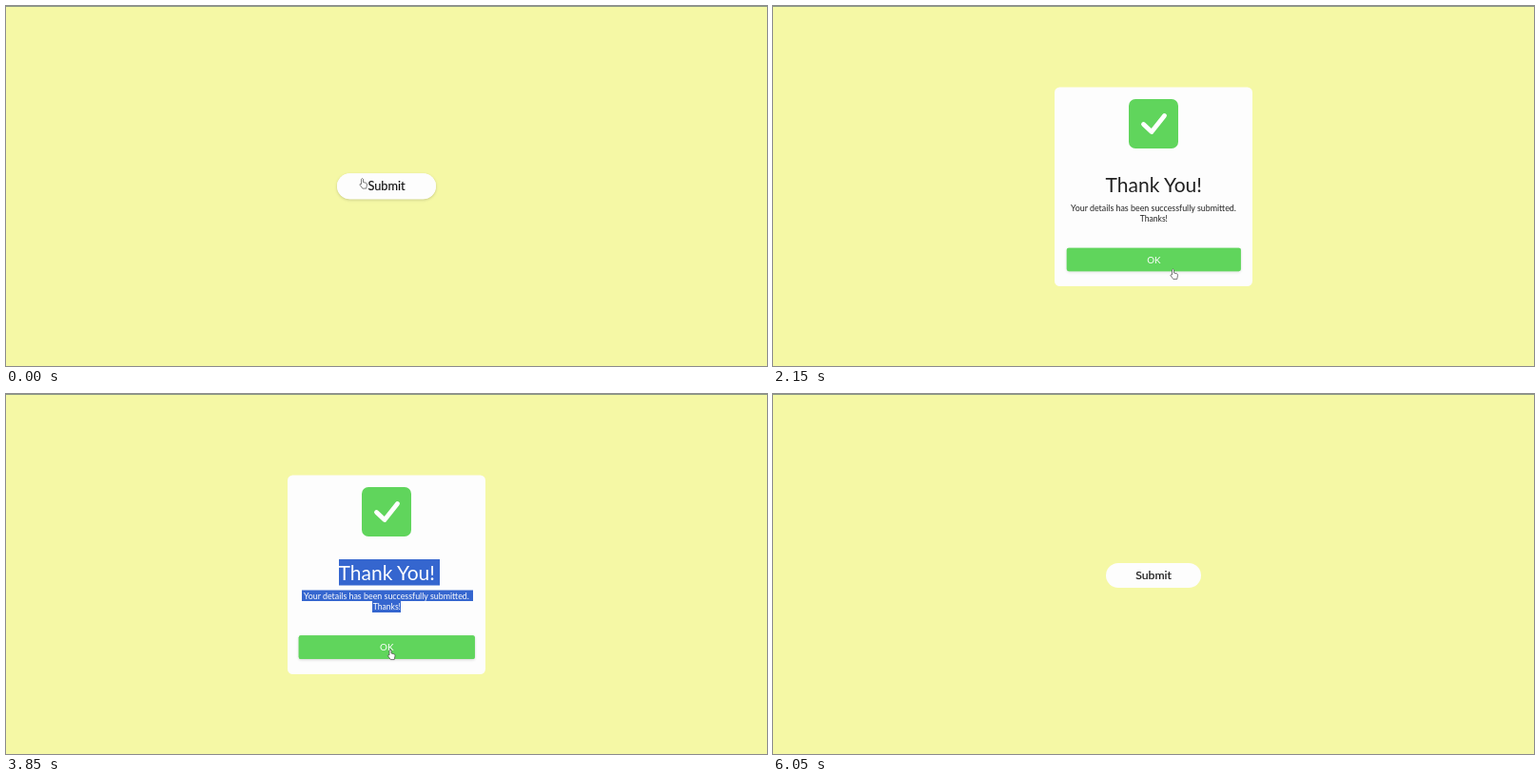
An HTML page for the animation above (6.15 s loop, 800 by 379 pixels).

```html
<!DOCTYPE html>
<html lang="en">
<head>
<meta charset="utf-8">
<title>Submit popup</title>
<style>
  html, body { margin: 0; width: 100%; height: 100%; overflow: hidden; background: #f5f8a5; }
  svg { display: block; width: 100vw; height: 100vh; }
  text { font-family: Lato, sans-serif; text-anchor: middle; }
  .shade { filter: drop-shadow(0 1.5px 1.5px rgba(0, 0, 0, .18)); }
  .ink { fill: #222; }
  .picked .ink { fill: #fff; }
  #marks { fill: #3566cf; visibility: hidden; }
  .picked #marks { visibility: inherit; }
  #cursor path { fill: #fff; stroke: #444; stroke-width: .7; stroke-linejoin: round; }
</style>
</head>
<body>
<svg viewBox="0 0 800 379">
  <rect width="800" height="379" fill="#f5f8a5"/>
  <rect width="800" height="1" fill="#8f9c86"/>

  <g id="submit" fill="#fdfdfd">
    <rect class="shade" x="-50" y="-13" width="100" height="26" rx="13"/>
    <rect x="-50" y="-13" width="100" height="26" rx="13"/>
    <text y="4.2" font-size="12.3" fill="#111" stroke="#111" stroke-width=".15">Submit</text>
  </g>

  <g id="popup">
    <g transform="translate(-400 -190)">
      <g id="panel">
        <rect x="296" y="85.5" width="208" height="209.5" rx="5.5" fill="#fdfdfd"/>
        <rect x="374" y="98" width="52" height="52" rx="7" fill="#60d55c"/>
        <path d="M389.5 124.5L398 132.5L411.5 115.5" fill="none" stroke="#fff" stroke-width="4.8"
              stroke-linecap="round" stroke-linejoin="round"/>
        <g id="marks">
          <rect x="350" y="174" width="106" height="27.5"/>
          <rect x="311" y="206.5" width="180" height="11.5"/>
          <rect x="385" y="218" width="30" height="12"/>
        </g>
        <text class="ink" x="400.3" y="196" font-size="21">Thank You!</text>
        <text class="ink" x="400" y="215.6" font-size="8.9">Your details has been successfully submitted.</text>
        <text class="ink" x="400.3" y="227.4" font-size="8.6">Thanks!</text>
      </g>
      <g id="ok" fill="#60d55c">
        <rect class="shade" x="-88.5" y="-11.8" width="177" height="23.6" rx="2"/>
        <rect x="-88.5" y="-11.8" width="177" height="23.6" rx="2"/>
        <text y="3.6" font-size="9.4" fill="#fff">OK</text>
      </g>
    </g>
  </g>

  <g id="cursor">
    <path id="arrow" d="M0 0V7.4L1.7 5.9L2.8 8.3L3.9 7.8L2.8 5.5H5Z"/>
    <path id="hand" d="M-1 .9Q0 -.8 1 .9V4L4 4.8Q5.2 5.2 5 6.6L4.2 10.6H.3L-2.6 6.6Q-2.6 5.4 -1 6Z"/>
  </g>
</svg>
<script>
  const LOOP = 6150, STEP = 50;
  const MOVE = 400;    // popup travel
  const HOVER = 200;   // button transition
  const LEAVE = 5850;  // pointer gone
  const SELECT = 3000; // text gets selected, until the popup closes

  const rounds = [
    { open: 820, close: 2230 },
    { open: 2580, close: 3890 },
    { open: 4560, close: 5640 }
  ];

  const buttons = {
    submit: { x: 400, y: 191, w: 50, h: 14, grow: .04 },
    ok: { x: 400.3, y: 267.8, w: 88.5, h: 12, grow: .05 }
  };

  // pointer tip: ms, x, y
  const route = [
    [0, 374.5, 181.5], [300, 392, 226], [700, 402, 188],
    [1200, 424, 127], [1500, 405.5, 267], [1680, 412, 317], [2150, 420.5, 277],
    [2550, 404, 188], [3250, 439, 154], [3850, 404, 269],
    [4350, 392.5, 182.5], [4560, 394, 183], [4950, 417.5, 150.5], [5550, 406, 268]
  ];

  const el = id => document.getElementById(id);
  const clamp = v => Math.min(1, Math.max(0, v));
  const show = (id, on) => el(id).setAttribute('visibility', on ? 'inherit' : 'hidden');
  const lastRound = t => rounds.filter(r => r.open <= t).pop();
  const isOpen = t => !!lastRound(t) && t < lastRound(t).close;

  // cubic-bezier(.25, .1, .25, 1)
  function ease(x) {
    if (x <= 0 || x >= 1) return clamp(x);
    const bez = (a, b, u) => 3 * a * u * (1 - u) ** 2 + 3 * b * u * u * (1 - u) + u ** 3;
    let lo = 0, hi = 1;
    for (let i = 0; i < 20; i++) {
      const mid = (lo + hi) / 2;
      if (bez(.25, .25, mid) < x) lo = mid; else hi = mid;
    }
    return bez(.1, 1, lo);
  }

  function pointAt(t) {
    const i = route.findIndex(p => p[0] > t);
    if (i < 0) return route[route.length - 1].slice(1);
    const [t0, x0, y0] = route[i - 1], [t1, x1, y1] = route[i];
    const u = (t - t0) / (t1 - t0), k = u * u * (3 - 2 * u);
    return [x0 + (x1 - x0) * k, y0 + (y1 - y0) * k];
  }

  function isOver(id, t) {
    const b = buttons[id], [x, y] = pointAt(t);
    return isOpen(t) === (id === 'ok') && Math.abs(x - b.x) < b.w && Math.abs(y - b.y) < b.h;
  }

  // share of the last HOVER ms spent over the button
  function hoverAt(id, t) {
    const n = 20;
    let hits = 0;
    for (let i = 0; i < n; i++) hits += isOver(id, Math.max(0, t - i * HOVER / n));
    return ease(hits / n);
  }

  function drawButton(id, t) {
    const { x, y, grow } = buttons[id], h = hoverAt(id, t);
    el(id).setAttribute('transform', `translate(${x} ${y - 1.2 * h}) scale(${1 + grow * h})`);
    el(id).querySelector('.shade').style.opacity = h;
  }

  // on closing the panel hides at once, while its button lingers and flies up
  function drawPopup(t) {
    const round = lastRound(t), open = isOpen(t);
    show('panel', open);
    show('ok', round && t < round.close + HOVER);
    if (!round) return;
    const p = ease((t - round.open) / MOVE) - ease((t - round.close) / MOVE);
    el('popup').setAttribute('transform', `translate(400 ${190 * p}) scale(${.1 + .9 * p})`);
    el('panel').classList.toggle('picked', open && round === rounds[1] && t >= SELECT);
  }

  function drawCursor(t) {
    const hand = isOver('submit', t) || isOver('ok', t);
    el('cursor').setAttribute('transform', `translate(${pointAt(t)})`);
    show('cursor', t < LEAVE);
    show('hand', hand);
    show('arrow', !hand);
  }

  function tick() {
    const t = Math.floor(performance.now() % LOOP / STEP) * STEP;
    Object.keys(buttons).forEach(id => drawButton(id, t));
    drawPopup(t);
    drawCursor(t);
    requestAnimationFrame(tick);
  }
  tick();
</script>
</body>
</html>
```
